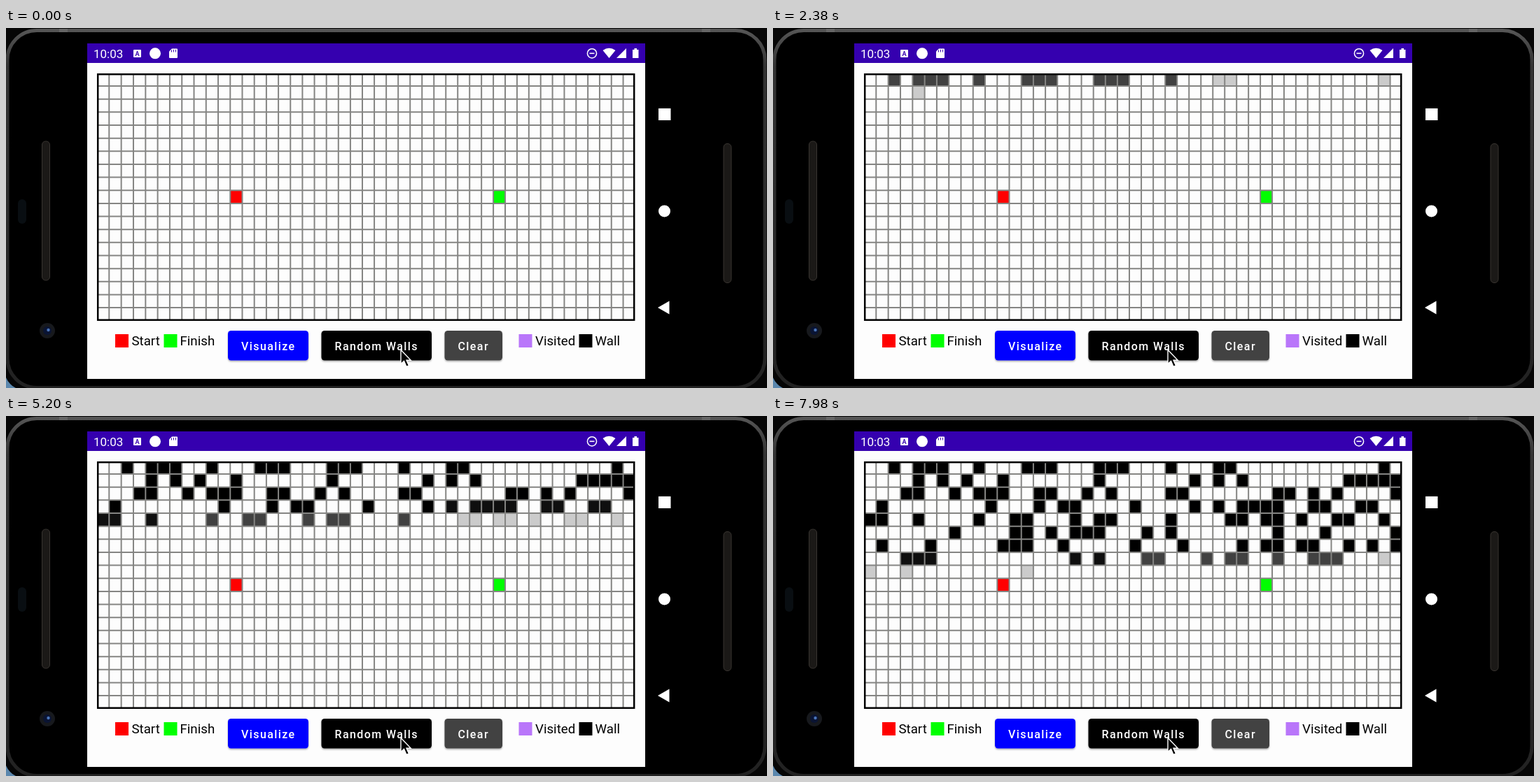
Animation, 1087 px wide and 515 px high, one loop 8000 ms. Source, as an HTML page:

```html
<!DOCTYPE html>
<html lang="en">
<head>
<meta charset="utf-8">
<title>Grid walls</title>
<style>
html, body { margin: 0; width: 100%; height: 100%; overflow: hidden; background: #000; }
svg { display: block; width: 1087px; height: 515px; font-family: Roboto, sans-serif; }
.label { font-size: 18.7px; }
.button { font-size: 16px; font-weight: 500; letter-spacing: 1.4px; fill: #fff; }
</style>
</head>
<body>
<svg viewBox="0 0 1087 515">
  <defs>
    <linearGradient id="rim" x2="0" y2="1">
      <stop offset="0" stop-color="#555"/>
      <stop offset=".1" stop-color="#333"/>
      <stop offset="1" stop-color="#222"/>
    </linearGradient>
    <filter id="shadow" x="-10%" y="-20%" width="120%" height="150%">
      <feDropShadow dx="0" dy="1.5" stdDeviation="1.2" flood-opacity=".35"/>
    </filter>
  </defs>

  <!-- Phone body -->
  <rect width="1087" height="515" fill="#060606"/>
  <path d="M0 500Q4 510 14 515H0Z" fill="#5b87ad"/>
  <rect x="2" y="3.5" width="1082" height="511" rx="42" fill="#000" stroke="url(#rim)" stroke-width="5"/>
  <path d="M76 1h12v5h-12zM994 1h12v5h-12z" fill="#666"/>
  <g fill="#1b1917" stroke="#393531">
    <rect x="51.5" y="162" width="11" height="199" rx="5"/>
    <rect x="1025" y="165.500" width="11" height="199" rx="5"/>
  </g>
  <rect x="17" y="245" width="12" height="35" rx="6" fill="#090e12"/>
  <circle cx="59" cy="433" r="11" fill="#17191d"/>
  <circle cx="59" cy="433" r="6" fill="#0a1433"/>
  <circle cx="60.500" cy="432" r="2.200" fill="#4a74b8"/>
  <g fill="#fff">
    <rect x="932" y="115" width="17.500" height="17"/>
    <circle cx="940.500" cy="262" r="8.500"/>
    <path d="M931 400L947.500 390.500V409.500Z"/>
  </g>

  <!-- Screen and status bar -->
  <rect x="116" y="22" width="797" height="480" fill="#fdfdfd"/>
  <rect x="116" y="22" width="797" height="28" fill="#3500af"/>
  <g fill="#fff">
    <text x="125" y="42.500" font-size="17">10:03</text>
    <rect x="182" y="31" width="11" height="11" rx="1"/>
    <text x="187.500" y="39.700" font-size="9" font-weight="700" text-anchor="middle" style="fill:#3500af">A</text>
    <circle cx="213" cy="36.300" r="8"/>
    <path d="M237 29.500h7q1 0 1 1v11.500q0 1-1 1h-10q-1 0-1-1v-8.500z"/>
    <path d="M236.500 31.500v3M239.500 31v3.500M242.500 31v3.500" stroke="#3500af"/>
    <circle cx="837" cy="36.300" r="6.600" fill="none" stroke="#fff" stroke-width="1.500"/>
    <rect x="833.500" y="35.500" width="7" height="1.600"/>
    <path d="M852.500 32Q861.500 25.500 870.500 32L861.500 43ZM872 43L886 29V43Z"/>
    <path d="M895 31h2.500v-2h3.500v2h2.500v12h-8.500z"/>
  </g>

  <!-- Grid -->
  <g id="cells"></g>
  <path id="lines" stroke="#858583" stroke-width="2"/>
  <rect x="131.200" y="66.200" width="766" height="351.500" fill="none" stroke="#000" stroke-width="2.500"/>

  <!-- Legend and buttons -->
  <rect x="156" y="438" width="19" height="19" fill="#f00"/>
  <rect x="225.500" y="438" width="19" height="19" fill="#0f0"/>
  <rect x="732.500" y="438" width="19" height="19" fill="#b976fa"/>
  <rect x="818.500" y="438" width="19" height="19"/>
  <g class="label">
    <text x="179.500" y="453.500">Start</text>
    <text x="248.500" y="453.500">Finish</text>
    <text x="756" y="453.500">Visited</text>
    <text x="841.500" y="453.500">Wall</text>
  </g>
  <g filter="url(#shadow)">
    <rect x="317" y="433" width="115" height="42.500" rx="4.500" fill="#00f"/>
    <rect x="450.500" y="433" width="157.500" height="42.500" rx="4.500"/>
    <rect x="626.500" y="433" width="82.500" height="42.500" rx="4.500" fill="#434343"/>
  </g>
  <g class="button">
    <text x="336" y="460.700">Visualize</text>
    <text x="469.500" y="460.700">Random Walls</text>
    <text x="645.500" y="460.700">Clear</text>
  </g>
  <path d="M564 460.500V480.500L568.500 476.500L572 484.500L575.500 483L572 475.200H578.200Z" stroke="#fff" stroke-width="1.400"/>
</svg>
<script>
const COLS = 45, ROWS = 19, LOOP = 8000;
const FIRST_BATCH = 1790, BATCH_TIME = 365;

// Wall columns for each row, as single cells and runs
const walls = [
  "2 4-6 9 13-15 19-21 25 29-30 43",
  "4 6 8 11 19 27 29 31 40-44",
  "3-4 7 9-11 14-15 18 20 25-26 34-35 37 39 44",
  "1 10 14 16-17 22 27 29 31-34 37-38 41-42",
  "0-1 4 9 12-13 17 19-20 25 30-31 33-34 36 39-40 43",
  "7 12-13 15 17-19 23 25 34 38 44",
  "1 5 11-13 16 22 26 31 33-34 36-37 40 42 44",
  "3-5 17 19 23-24 28 30-31 34 37-39 43",
  "0 3 13"
];
// Cells are scanned in batches; each entry is where a batch ends
const batchEnds = [27, 50, 73, 95, 118, 140, 163, 185, 207, 229, 249, 270, 291, 316, 336, 356, 376];
const fade = [0.2, 0.74, 0.94, 1];

const cells = document.getElementById("cells");
// Columns narrow slightly toward the right
const colX = c => 129.9 + 17.38 * c - 0.00675 * c * c;
const rowY = r => 64.4 + 18.65 * r;

function addCell(row, col, color) {
  const rect = document.createElementNS("http://www.w3.org/2000/svg", "rect");
  const x = Math.max(colX(col), 131), y = Math.max(rowY(row), 66);
  const box = { x, y, width: Math.min(colX(col + 1), 897) - x, height: rowY(row + 1) - y, fill: color };
  for (const key in box) rect.setAttribute(key, box[key]);
  return cells.appendChild(rect);
}

let grid = "";
for (let c = 1; c < COLS; c++) grid += `M${colX(c)} 66V417`;
for (let r = 1; r < ROWS; r++) grid += `M131 ${rowY(r)}H897`;
document.getElementById("lines").setAttribute("d", grid);

addCell(9, 11, "#f00");
addCell(9, 33, "#0f0");

const wallCells = [];
walls.forEach((runs, row) => {
  for (const run of runs.split(" ")) {
    const [from, to = from] = run.split("-").map(Number);
    for (let col = from; col <= to; col++) {
      const batch = batchEnds.findIndex(end => row * COLS + col < end);
      wallCells.push({ rect: addCell(row, col, "#000"), batch });
    }
  }
});

function draw() {
  const time = performance.now() % LOOP;
  const current = Math.floor((time - FIRST_BATCH) / BATCH_TIME);
  for (const { rect, batch } of wallCells) {
    const age = current - batch;
    rect.setAttribute("opacity", age < 0 ? 0 : fade[Math.min(age, 3)]);
  }
  requestAnimationFrame(draw);
}
draw();
</script>
</body>
</html>
```
